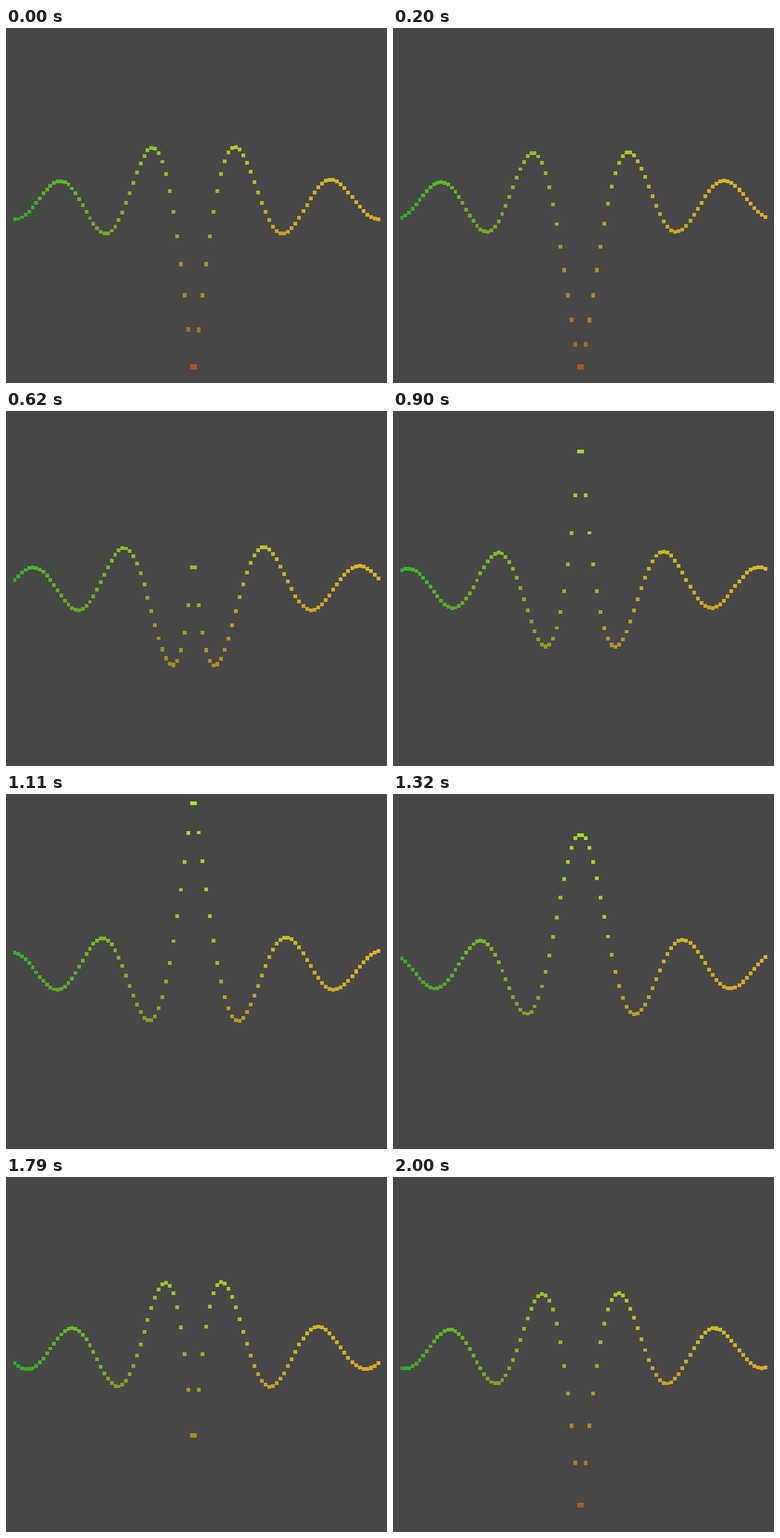
Recreate the animation shown at these times as an HTML page with a canvas. Size 513 by 478 pixels, loop 2070 ms.

```html
<!DOCTYPE html>
<html lang="en">
<head>
<meta charset="utf-8">
<title>Ripple graph</title>
<style>
  html, body { margin: 0; width: 100%; height: 100%; overflow: hidden; background: #474747; }
  canvas { display: block; }
</style>
</head>
<body>
<canvas id="stage" width="513" height="478"></canvas>
<script>
const ctx = document.getElementById('stage').getContext('2d');

const COUNT = 100;       // cubes along the x axis, from -1 to 1
const SCALE = 247.3;     // pixels per unit at the centre
const CENTER = { x: 252.5, y: 234.6 };
const TURN = 0.0184;     // the right end is slightly nearer
const TILT = 0.65;
const PITCH = 3.5;       // vertical perspective
const HORIZON = 245;

const LOOP = 2070;
const STEPS = 30;
const SHORT_STEPS = [3, 23, 24];
const START_PHASE = 0.4746;

const starts = [0];
for (let i = 0; i < STEPS - 1; i++) {
  starts.push(starts[i] + (SHORT_STEPS.includes(i) ? 60 : 70));
}

function ripple(u, phase) {
  const d = Math.abs(u);
  return Math.sin(Math.PI * (4 * d - phase)) / (1 + 10 * d);
}

function gamma(c) {
  const v = c <= 0.0031 ? 12.92 * c : 1.055 * c ** (1 / 2.4) - 0.055;
  return Math.round(255 * Math.min(1, v));
}

function shade(u, v, light) {
  const r = 0.02 + 0.7 * (u + 1) / 2;
  const g = 0.05 + 0.76 * (v + 1) / 2;
  return `rgb(${[r, g, 0.02].map(c => gamma(c * light)).join(',')})`;
}

function fillEdges(left, top, right, bottom) {
  const [l, t, r, b] = [left, top, right, bottom].map(Math.round);
  ctx.fillRect(l, t, r - l, b - t);
}

function drawCube(u, phase) {
  const v = ripple(u, phase);
  const s = SCALE / (1 - TURN * u);
  const half = s / COUNT;
  const x = CENTER.x + s * u;
  const y = CENTER.y - TILT * u - s * v + PITCH * v * v;
  const lid = Math.max(0, y - HORIZON) * 0.008;

  ctx.fillStyle = shade(u, v, 1);
  fillEdges(x - half, y - half, x + half, y + half);
  if (lid >= 0.5) {
    ctx.fillStyle = shade(u, v, 1.15);
    fillEdges(x - half, y - half - lid, x + half, y - half);
  }
}

function draw(now) {
  const time = now % LOOP;
  const step = starts.findLastIndex(start => start <= time);
  const phase = START_PHASE + 2 * step / STEPS;

  ctx.fillStyle = '#474747';
  ctx.fillRect(0, 0, 513, 478);
  for (let i = 0; i < COUNT; i++) drawCube((2 * i + 1) / COUNT - 1, phase);
}

const begin = performance.now();
function tick() {
  draw(performance.now() - begin);
  requestAnimationFrame(tick);
}
tick();
</script>
</body>
</html>
```
